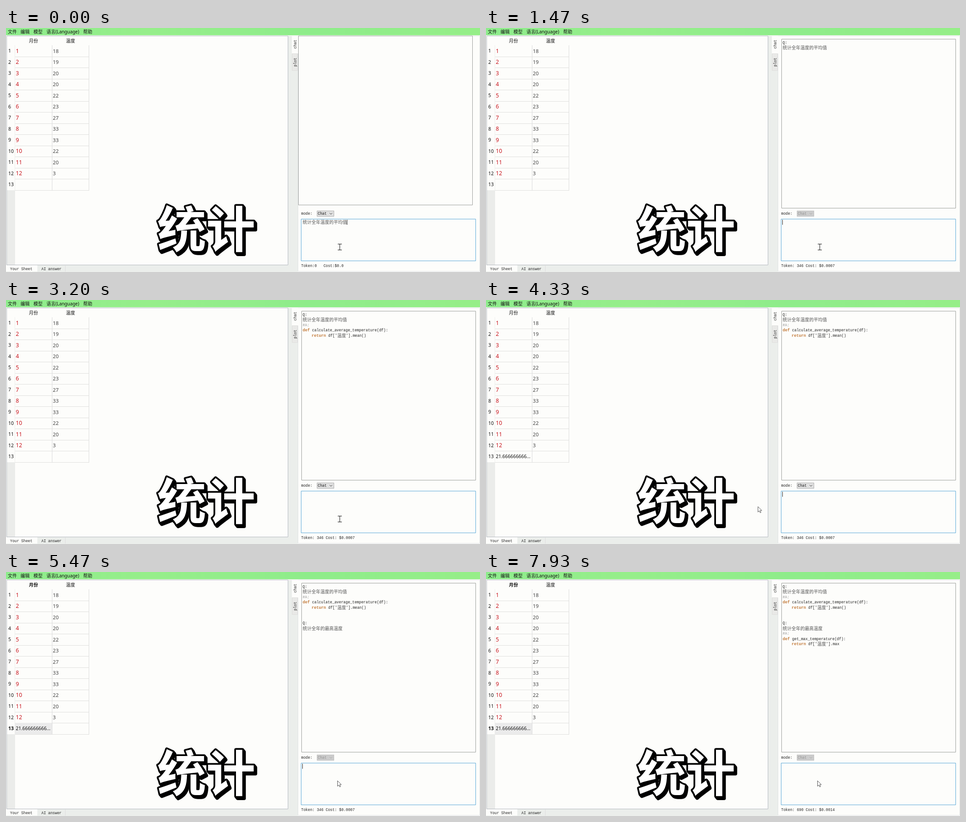
Write an HTML page with a canvas that moves like this. It is 1043 px wide and 537 px high and loops after 8 s.

```html
<!DOCTYPE html>
<html lang="zh">
<head>
<meta charset="utf-8">
<style>
  html, body { margin: 0; width: 100%; height: 100%; overflow: hidden; background: #fdfdfb; }
  canvas { display: block; }
</style>
</head>
<body>
<canvas id="stage" width="1043" height="537"></canvas>
<script>
const ctx = document.getElementById('stage').getContext('2d');
const LOOP = 8000;
const UI = '"Noto Sans", "Noto Sans CJK SC", "Noto Sans CJK", sans-serif';
const CJK = '"Noto Sans CJK SC", "Noto Sans CJK", sans-serif';
const MONO = '"Liberation Mono", monospace';
const PAPER = '#fdfdfb', CHROME = '#ebeeeb', BORDER = '#9c9f9c';

// Moments (ms) at which the interface changes
const SEND_1 = 70, REPLY_1 = 1470, DONE_1 = 3110;
const INSERT = 4050, SELECT = 4690, REFOCUS = 5130, PASTE = 5250;
const SEND_2 = 5400, REPLY_2 = 6730;
const BLINK = 354;

const QUESTION_1 = '统计全年温度的平均值';
const QUESTION_2 = '统计全年的最高温度';
const ANSWER_1 = "#A:\ndef calculate_average_temperature(df):\n    return df['温度'].mean()";
const ANSWER_2 = "#A:\ndef get_max_temperature(df):\n    return df['温度'].max()";
const TEMPERATURES = [18, 19, 20, 20, 22, 23, 27, 33, 33, 22, 20, 3];

// Pointer stops: time, x, y
const POINTER = [[4250, 734, 482], [4650, 62, 345], [4870, 62, 345], [4930, 509, 377], [5110, 729, 459]];

function box(x, y, w, h, fill, stroke) {
  if (fill) { ctx.fillStyle = fill; ctx.fillRect(x, y, w, h); }
  if (stroke) {
    ctx.strokeStyle = stroke;
    ctx.lineWidth = 1;
    ctx.strokeRect(x + 0.5, y + 0.5, w - 1, h - 1);
  }
}

function label(text, x, y, size, color = '#111', weight = 400, align = 'left') {
  ctx.font = `${weight} ${size}px ${UI}`;
  ctx.fillStyle = color;
  ctx.textAlign = align;
  ctx.fillText(text, x, y + size * 0.36);
}

// Fixed-pitch text with double-width Chinese characters and bold keywords
function mono(text, x, y, color = '#222') {
  ctx.textAlign = 'left';
  for (const run of text.split(/([\u4e00-\u9fff]+|\b(?:def|return)\b)/)) {
    const keyword = run === 'def' || run === 'return';
    const chinese = /[\u4e00-\u9fff]/.test(run);
    ctx.font = keyword ? `bold 8.8px ${MONO}` : chinese ? `300 9.75px ${CJK}` : `8.2px ${MONO}`;
    ctx.fillStyle = keyword ? '#c27a3a' : chinese ? '#555' : color;
    ctx.fillText(run, x, y + (chinese ? 3.6 : 2.7));
    x += ctx.measureText(run).width;
  }
}

function drawBackground() {
  box(0, 0, 1043, 537, PAPER);
  const green = ctx.createLinearGradient(0, 0, 1043, 0);
  green.addColorStop(0, '#8eec8c');
  green.addColorStop(0.3, '#96ee8a');
  green.addColorStop(0.65, '#8eec8a');
  green.addColorStop(1, '#96ee88');
  box(0, 0, 1043, 16, green);
  [['文件', 4], ['编辑', 32], ['模型', 60.5], ['语言(Language)', 89], ['帮助', 170]]
    .forEach(([text, x]) => label(text, x, 8.5, 9.9));
}

function drawFrames() {
  box(621, 17, 21, 520, CHROME);
  box(0, 522, 642, 15, CHROME);
  box(1, 17, 620, 505, null, '#b4b8c0');
  box(0, 522, 69, 14, PAPER);
  box(130, 523, 1, 13, '#dcdcdc');
  mono('Your Sheet', 9, 530);
  mono('AI answer', 78, 530);

  box(642, 17, 401, 519, null, '#e0e3e4');
  box(629, 18, 14, 38, PAPER);
  box(629, 56, 13, 38, '#e9e9e7', '#dededc');
  [['chat', 45.5], ['plot', 85]].forEach(([text, y]) => {
    ctx.save();
    ctx.translate(636, y);
    ctx.rotate(-Math.PI / 2);
    mono(text, 0, 0);
    ctx.restore();
  });
}

function drawTable(t) {
  const selected = t >= SELECT;
  box(2, 357, 18, 164, '#ebecea');
  for (let row = 1; row <= 13; row++) box(20, Math.round(38 + row * 24.5), 163, 1, '#e0e0de');
  box(19, 38, 1, 319, '#eeeeec');
  box(101, 38, 1, 319, '#dcdcdc');
  box(182, 38, 1, 319, '#dcdcdc');
  label('月份', 60.5, 28.5, 9.9, '#111', selected ? 700 : 400, 'center');
  label('温度', 142, 28.5, 9.9, '#111', 400, 'center');

  for (let row = 1; row <= 13; row++) {
    const y = 26 + row * 24.5;
    label(row, 5, y, 10.6, '#111', selected && row === 13 ? 700 : 400);
    if (row < 13) {
      label(row, 21.5, y, 12.2, '#c8141c');
      label(TEMPERATURES[row - 1], 103, y, 11.2, '#444');
    }
  }
  if (t < INSERT) return;
  const active = selected && t < REFOCUS;
  if (selected) box(20, 332, 81, 25, active ? '#0078d7' : '#ebebeb', active ? '#3c5878' : null);
  label('21.666666666...', 21.5, 344.5, 10.35, active ? '#fff' : '#111');
}

function drawTitle() {
  ctx.font = `bold 108px ${CJK}`;
  ctx.textAlign = 'center';
  ctx.lineJoin = 'round';
  ctx.lineWidth = 7.5;
  ctx.strokeStyle = '#000';
  for (let d = 5; d >= 0; d--) ctx.strokeText('统计', 440.5 + d * 0.8, 483 + d);
  ctx.fillStyle = '#fff';
  ctx.fillText('统计', 440.5, 483);
}

// The part of an answer received by time t, as lines
function received(answer, t, start, perChar) {
  const count = Math.floor((t - start) / perChar);
  return count > 0 ? answer.slice(0, count).split('\n') : [];
}

function drawConversation(t) {
  const sent = t >= SEND_1;
  const shift = sent ? 0 : -7;
  box(650 + shift, 24 + shift, 384, 373, null, BORDER);
  const write = (lines, first) => lines.forEach((line, i) =>
    mono(line, 652.8, 32 + 11.5 * (first + i), line.startsWith('#') ? '#909090' : '#222'));
  if (sent) {
    write(['Q:', QUESTION_1], 0);
    write(received(ANSWER_1, t, REPLY_1 + 20, 23.3), 2);
  }
  if (t >= SEND_2) {
    write(['Q:', QUESTION_2], 7);
    write(received(ANSWER_2, t, REPLY_2 + 10, 21.1), 9);
  }
}

function drawInput(t) {
  const busy = (t >= SEND_1 && t < DONE_1) || t >= SEND_2;
  const focused = t < SELECT || t >= REFOCUS;
  mono('mode:', 649.5, 408.5);
  box(684, 402, 38, 13, busy ? '#cccccc' : '#e1e1e1', busy ? '#c0c0c0' : '#adadad');
  mono('Chat', 686, 408.5, busy ? '#929292' : '#111');
  ctx.strokeStyle = busy ? '#aaa' : '#444';
  ctx.lineWidth = 1;
  ctx.beginPath();
  ctx.moveTo(712, 407);
  ctx.lineTo(715, 410);
  ctx.lineTo(718, 407);
  ctx.stroke();

  box(649, 420, 385, 93, PAPER, focused ? '#5aa8d8' : BORDER);
  const draft = t < SEND_1 ? QUESTION_1 : t >= PASTE && t < SEND_2 ? QUESTION_2 : '';
  mono(draft, 652.8, 427.5);
  const blinkStart = t < REFOCUS ? 1410 : t < SEND_2 ? REFOCUS : SEND_2;
  if (focused && Math.floor((t - blinkStart) / BLINK) % 2 === 0) {
    box(652 + Math.round(draft.length * 9.8), 422, 1, 11, '#222');
  }
  const usage = t < REPLY_1 ? 'Token:0   Cost:$0.0'
    : t < REPLY_2 ? 'Token: 346 Cost: $0.0007' : 'Token: 690 Cost: $0.0014';
  mono(usage, 649.5, 523);
}

function pointerAt(t) {
  const next = POINTER.findIndex(stop => stop[0] > t);
  if (next === 0) return POINTER[0].slice(1);
  if (next < 0) return POINTER.at(-1).slice(1);
  const [t0, x0, y0] = POINTER[next - 1], [t1, x1, y1] = POINTER[next];
  const k = (t - t0) / (t1 - t0);
  return [x0 + (x1 - x0) * k, y0 + (y1 - y0) * k];
}

function drawPointer(t) {
  const [x, y] = pointerAt(t);
  ctx.lineWidth = 1;
  ctx.save();
  ctx.translate(x, y);
  if (t < 4290) {
    box(0, -6, 1, 13, '#111');
    box(-4, -7, 9, 1, '#111');
    box(-4, 6, 9, 1, '#111');
  } else {
    const arrow = new Path2D('M.5 .5V12.5L3.3 9.8L5.3 14L7.2 13.2L5.3 9H9Z');
    ctx.fillStyle = '#fff';
    ctx.strokeStyle = '#555';
    ctx.lineJoin = 'miter';
    ctx.fill(arrow);
    ctx.stroke(arrow);
  }
  ctx.restore();
}

function draw() {
  const t = performance.now() % LOOP;
  drawBackground();
  drawFrames();
  drawTable(t);
  drawConversation(t);
  drawInput(t);
  drawTitle();
  drawPointer(t);
  requestAnimationFrame(draw);
}
draw();
</script>
</body>
</html>
```
